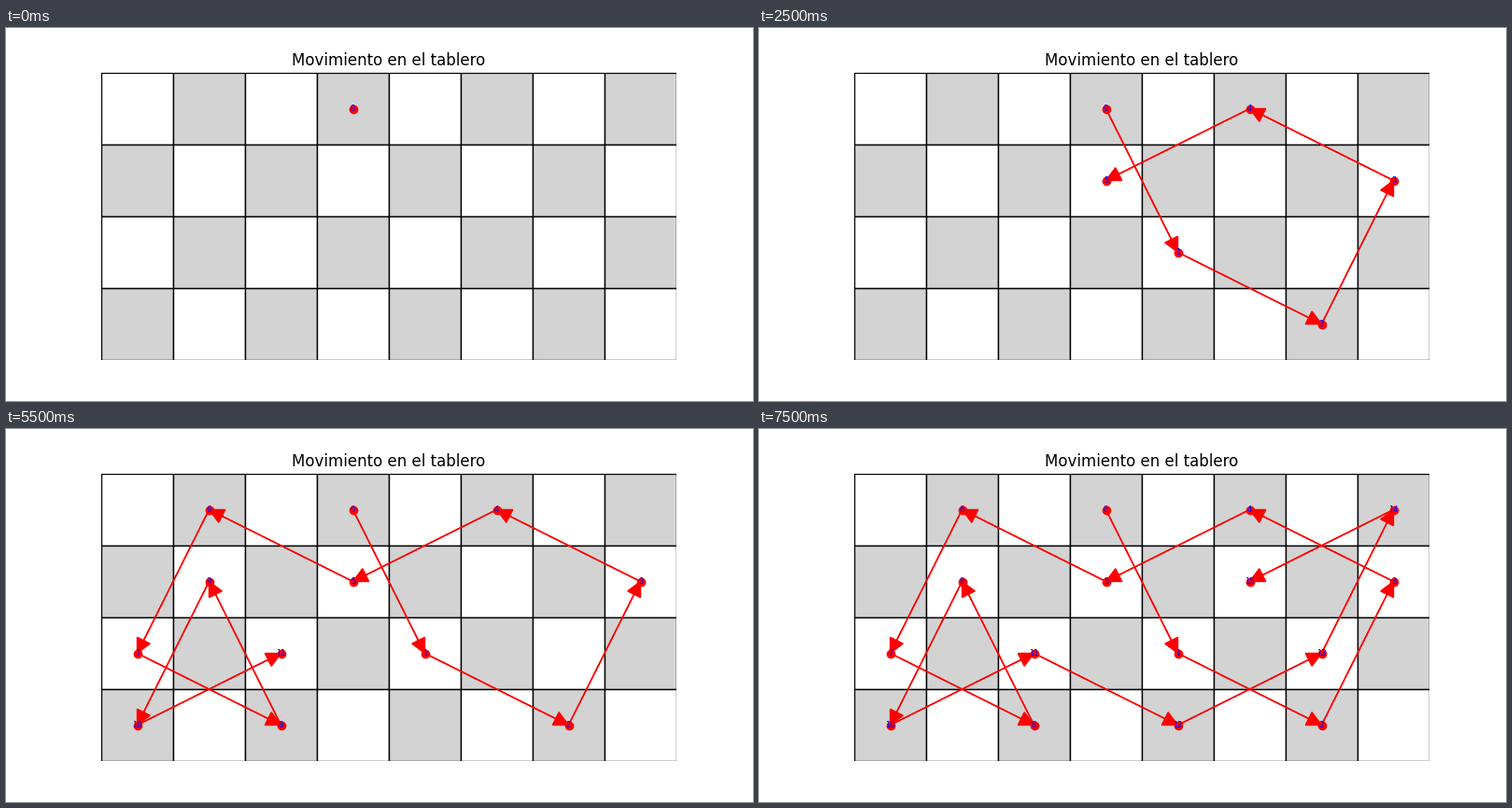
A matplotlib script for the animation above (8000 ms loop, 800 by 400 pixels).

```python
import matplotlib.pyplot as plt
from matplotlib.animation import FuncAnimation
from matplotlib.patches import Rectangle

COLS, ROWS = 8, 4
# (column, row) of each square visited by the knight
PATH = [(3, 0), (4, 2), (6, 3), (7, 1), (5, 0), (3, 1), (1, 0), (0, 2),
        (2, 3), (1, 1), (0, 3), (2, 2), (4, 3), (6, 2), (7, 0), (5, 1)]

fig, ax = plt.subplots(figsize=(8, 4), dpi=100)
ax.set_xlim(0, COLS)
ax.set_ylim(ROWS, 0)
ax.set_aspect("equal")
ax.axis("off")
ax.set_title("Movimiento en el tablero")


def draw_board():
    for row in range(ROWS):
        for col in range(COLS):
            color = "lightgray" if (row + col) % 2 else "white"
            ax.add_patch(Rectangle((col, row), 1, 1,
                                   facecolor=color, edgecolor="black"))


def make_step(i):
    """Dot, label and incoming arrow of one stop."""
    x, y = PATH[i][0] + 0.5, PATH[i][1] + 0.5
    artists = ax.plot(x, y, "ro")
    artists.append(ax.text(x, y, str(i), color="blue", fontsize=6,
                           ha="center", va="center"))
    if i:
        x0, y0 = PATH[i - 1][0] + 0.5, PATH[i - 1][1] + 0.5
        artists.append(ax.arrow(x0, y0, x - x0, y - y0,
                                head_width=0.2, head_length=0.2,
                                length_includes_head=True,
                                fc="red", ec="red"))
    return artists


draw_board()
steps = [make_step(i) for i in range(len(PATH))]


def update(frame):
    for i, artists in enumerate(steps):
        for artist in artists:
            artist.set_visible(i <= frame)
    return [artist for artists in steps for artist in artists]


anim = FuncAnimation(fig, update, frames=len(PATH), interval=500,
                     repeat=True, repeat_delay=0, blit=False)
plt.show()
```
